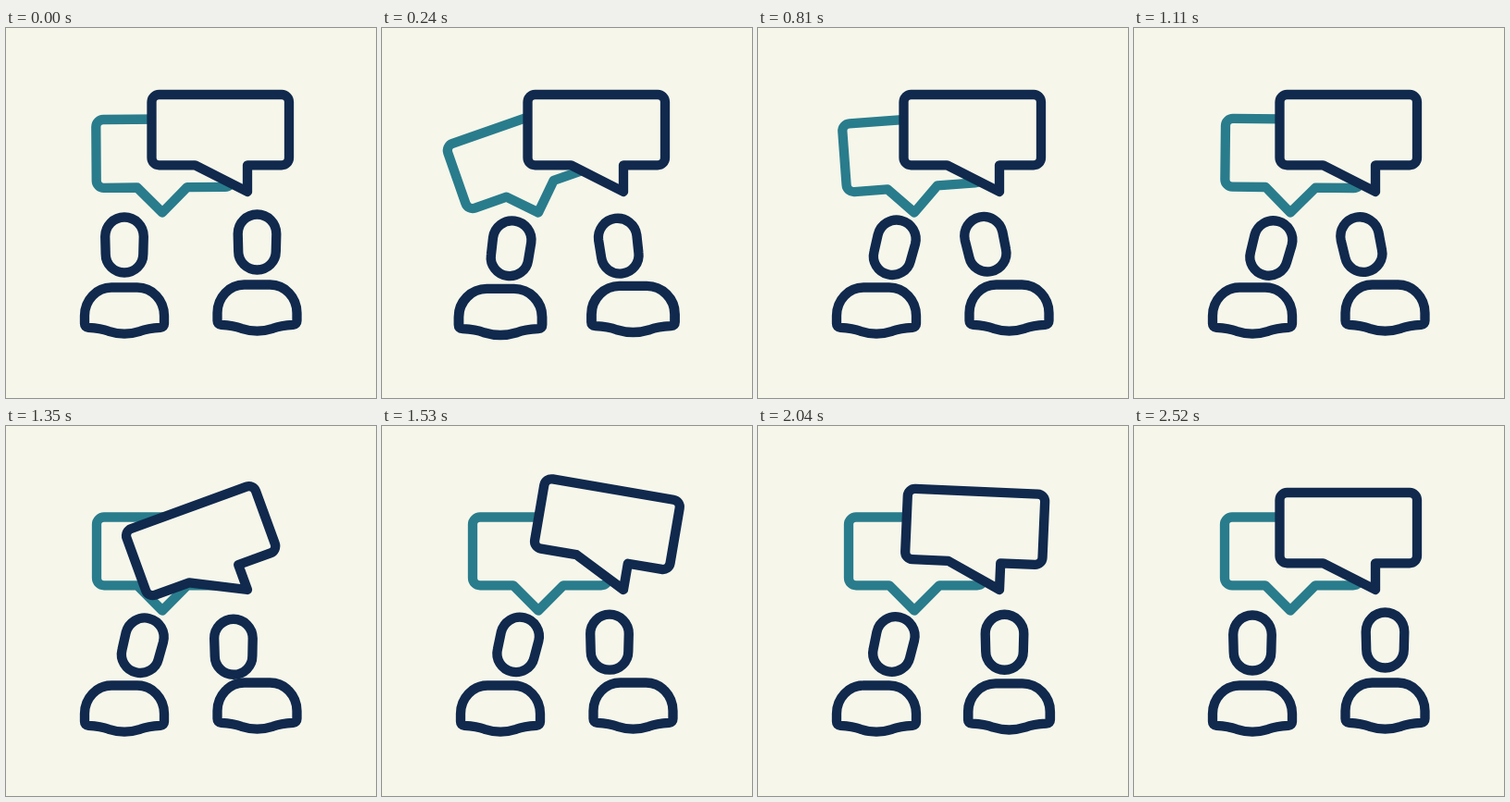
Animation, 400 px wide and 400 px high, one loop 2550 ms. Source, as an HTML page:

```html
<!DOCTYPE html>
<html lang="en">
<head>
<meta charset="utf-8">
<title>Conversation</title>
<style>
  html, body { margin: 0; height: 100%; overflow: hidden; background: #f6f6ea; }
  svg { display: block; width: 100%; height: 100%; }
  .ink { fill: none; stroke: #10294d; stroke-width: 10.3; stroke-linejoin: round; stroke-linecap: round; }
</style>
</head>
<body>
<svg viewBox="0 0 400 400">
  <defs>
    <path id="head" d="M-20.8-9A20.8 21 0 0 1 20.8-9L20.3 10A20.3 20 0 0 1-20.3 10Z"/>
    <path id="body" d="M-43 311A29 30.5 0 0 1-14 280.5H14A29 30.5 0 0 1 43 311V319.5Q43 323.5 39 323.8C29 324.4 23 325.5 17 327.8Q8 330.6 0 330.6Q-8 330.6-17 327.8C-23 325.5-29 324.4-39 323.8Q-43 323.5-43 319.5Z"/>
  </defs>
  <g class="ink">
    <path id="backBubble" stroke="#297c8c" d="M169 199.5L142 172.3H106a8 8 0 0 1-8-8V106.5a8 8 0 0 1 8-8H237a8 8 0 0 1 8 8V164.3a8 8 0 0 1-8 8H196Z"/>
    <path id="frontBubble" fill="#f6f6ea" d="M261 177V148.3H298a8 8 0 0 0 8-8V80a8 8 0 0 0-8-8H165.5a8 8 0 0 0-8 8V140.3a8 8 0 0 0 8 8H204.5Z"/>
    <use id="leftBody" href="#body"/>
    <use id="rightBody" href="#body"/>
    <use id="leftHead" href="#head"/>
    <use id="rightHead" href="#head"/>
  </g>
</svg>
<script>
const LOOP = 2550;
const SWING_TIME = 240;
const SWINGS = [0, -20, 15, -10, 3, 0];

const clamp = (v, max) => Math.min(Math.max(v, 0), max);

// Smooth 0 - 1 between two times
function ramp(t, from, to) {
  const p = clamp((t - from) / (to - from), 1);
  return p * p * (3 - 2 * p);
}

// Smooth 0 - 1 - 0 between two times
const pulse = (t, from, to) =>
  Math.sin(Math.PI * clamp((t - from) / (to - from), 1)) ** 2;

// Fading swing: one eased half turn per step
function wobble(t, start) {
  const step = clamp((t - start) / SWING_TIME, SWINGS.length - 1);
  const i = Math.min(Math.floor(step), SWINGS.length - 2);
  return SWINGS[i] + (SWINGS[i + 1] - SWINGS[i]) * ramp(step, i, i + 1);
}

const place = (id, transform) =>
  document.getElementById(id).setAttribute('transform', transform);

const placeHead = (id, x, y, angle) =>
  place(id, `translate(${x} ${y}) rotate(${angle})`);

// Squash a body: wider, and pressed down a little
const placeBody = (id, x, y, squash) =>
  place(id, `translate(${x} ${y + 1.5 * squash}) scale(${1 + 0.05 * squash} 1)`);

function draw(t) {
  place('backBubble', `rotate(${wobble(t, -20)} 169 199.5)`);
  place('frontBubble', `rotate(${wobble(t, 1110)} 261 177)`);

  // Heads lean in together, then straighten up one after the other
  const leanIn = ramp(t, 0, 420);
  const leftLean = leanIn - ramp(t, 2040, 2400);
  const rightLean = leanIn - ramp(t, 1740, 2160);
  const leftSquash = pulse(t, 0, 420) + pulse(t, 2040, 2400);
  const rightSquash = pulse(t, 0, 420) + pulse(t, 1740, 2160);
  placeBody('leftBody', 128, 0, leftSquash);
  placeBody('rightBody', 271.5, -3, rightSquash);

  // Each one nods while the other bubble or their own is moving
  const leftNod = pulse(t, 450, 1710);
  const rightNod = pulse(t, 1080, 1480);
  placeHead('leftHead',
    128 + 18.7 * leftLean + 1.5 * leftNod,
    234.5 + 1.5 * leftLean + 3 * leftSquash + 2 * leftNod,
    13 * leftLean + 2 * leftNod);
  placeHead('rightHead',
    271.5 - 25.5 * rightLean,
    231.5 + 2.2 * rightLean + 3 * rightSquash + 7 * rightNod,
    12.5 * (ramp(t, 1080, 1380) - leanIn));
}

function tick() {
  draw(performance.now() % LOOP);
  requestAnimationFrame(tick);
}
tick();
</script>
</body>
</html>
```
